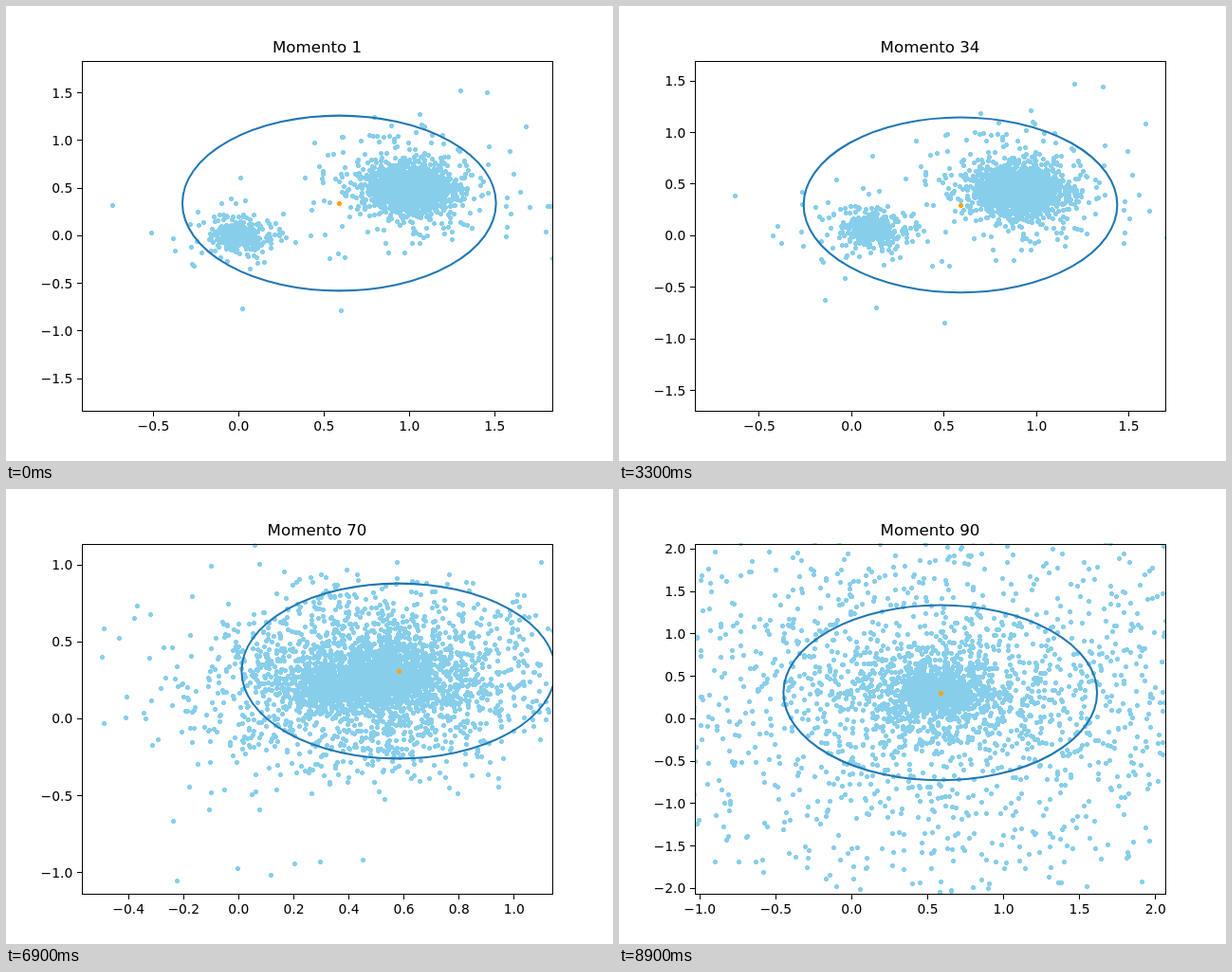
These frames come from a looping animation (640 px wide and 480 px high, 9000 ms). An HTML page with a canvas:

```html
<!DOCTYPE html>
<html lang="es">
<head>
<meta charset="utf-8">
<title>Momento</title>
<style>
  html, body { margin: 0; width: 100%; height: 100%; overflow: hidden; background: #fff; }
  canvas { display: block; }
</style>
</head>
<body>
<canvas id="plot" width="640" height="480"></canvas>
<script>
const ctx = document.getElementById('plot').getContext('2d');
const STEP_MS = 100, STEPS = 90, BURST = 62, TAU = 2 * Math.PI;
const BOX = { left: 80, top: 57.6, width: 496, height: 369.6 };
const X0 = BOX.left + BOX.width / 3, Y0 = BOX.top + BOX.height / 2;
const FONT = '"DejaVu Sans", sans-serif';

// Smooth curve through [time, value] keys
function track(...keys) {
  const last = keys.length - 1;
  const slope = k => {
    const a = keys[Math.max(k - 1, 0)], b = keys[Math.min(k + 1, last)];
    return (b[1] - a[1]) / (b[0] - a[0]);
  };
  return t => {
    let k = 0;
    while (k < last - 1 && t >= keys[k + 1][0]) k++;
    const [ta, a] = keys[k], [tb, b] = keys[k + 1];
    const d = tb - ta, u = (t - ta) / d, w = 1 - u;
    return a * (1 + 2 * u) * w * w + b * u * u * (3 - 2 * u)
      + d * u * w * (slope(k) * w - slope(k + 1) * u);
  };
}

const range = track([0, 1.838], [23, 1.779], [33, 1.697], [50, 1.502],
  [61, 1.0706], [66, 0.95], [76, 1.685], [89, 2.064]);
const centre = {
  x: track([0, 0.589], [50, 0.587], [76, 0.578], [89, 0.583]),
  y: track([0, 0.342], [23, 0.302], [50, 0.304], [76, 0.312], [89, 0.307])
};
const big = {
  x: track([0, 1], [33, 0.905], [50, 0.725], [61, 0.47], [76, 0.59], [89, 0.585]),
  y: track([0, 0.5], [33, 0.44], [50, 0.37], [61, 0.225], [76, 0.32], [89, 0.305])
};
const small = {
  x: track([0, 0], [33, 0.11], [50, 0.285], [61, 0.34], [76, 0.3], [89, 0.5]),
  y: track([0, 0], [33, 0.065], [50, 0.14], [61, 0.2], [76, 0.2], [89, 0.29])
};

let seed = 20417;
function rand() {
  seed = (seed + 0x6D2B79F5) | 0;
  let h = Math.imul(seed ^ (seed >>> 15), 1 | seed);
  h = (h + Math.imul(h ^ (h >>> 7), 61 | h)) ^ h;
  return ((h ^ (h >>> 14)) >>> 0) / 4294967296;
}

const bodies = [];
function addBody(path, r, speed, heading, start) {
  const a = rand() * TAU;
  bodies.push({
    path, start,
    x: r * Math.cos(a), y: r * Math.sin(a),
    vx: speed * Math.cos(heading), vy: speed * Math.sin(heading)
  });
}

// Round cluster with a dense core and a thin tail; most bodies fly apart after the burst
function addCluster(path, count, core) {
  for (let n = 0; n < count; n++) {
    const u = rand() * 0.998;
    const r = core * (u / (1 - u)) ** 0.42;
    const speed = rand() < 0.72 ? 0.09 * rand() ** 1.8 : 0;
    addBody(path, r, speed, rand() * TAU, BURST);
  }
}
addCluster(big, 3000, 0.11);
addCluster(small, 650, 0.068);

// Early escapes, mostly to the left
for (let n = 0; n < 50; n++) {
  const heading = Math.PI + (rand() - 0.5) * 3.6;
  addBody(small, 0.05 * rand(), 0.01 + 0.03 * rand(), heading, 12 + 46 * rand());
}

function dot(x, y) {
  x = Math.round(x);
  y = Math.round(y);
  ctx.fillRect(x - 2, y - 1, 5, 3);
  ctx.fillRect(x - 1, y - 2, 3, 5);
}

const tickStep = span => [0.1, 0.2, 0.25, 0.5, 1].find(s => span / s <= 9);

function ticks(low, high, draw) {
  const step = tickStep(high - low);
  for (let n = Math.ceil(low / step); n * step <= high; n++) {
    const v = n * step;
    const text = Math.abs(v).toFixed(step === 0.25 ? 2 : 1);
    draw(v, n < 0 ? '\u2212' + text : text);
  }
}

function drawAxes(r, px, py) {
  ctx.fillStyle = ctx.strokeStyle = '#000';
  ctx.lineWidth = 1;
  ctx.strokeRect(80.5, 58.5, 496, 369);
  ctx.font = '13.89px ' + FONT;
  ctx.textAlign = 'center';
  ticks(-r / 2, r, (v, text) => {
    ctx.fillRect(Math.round(px(v) - 0.5), 428, 1, 5);
    ctx.fillText(text, px(v), 448);
  });
  ctx.textAlign = 'right';
  ticks(-r, r, (v, text) => {
    ctx.fillRect(75, Math.round(py(v) - 0.5), 5, 1);
    ctx.fillText(text, 70.3, Math.round(py(v) + 5));
  });
}

function draw(i) {
  const r = range(i);
  const px = x => X0 + x * BOX.width / 1.5 / r;
  const py = y => Y0 - y * BOX.height / 2 / r;

  ctx.fillStyle = '#fff';
  ctx.fillRect(0, 0, 640, 480);
  ctx.save();
  ctx.beginPath();
  ctx.rect(BOX.left, BOX.top, BOX.width, BOX.height);
  ctx.clip();

  ctx.fillStyle = '#87ceeb';
  const at = new Map([big, small].map(p => [p, [p.x(i), p.y(i)]]));
  for (const b of bodies) {
    const [x, y] = at.get(b.path);
    const age = Math.max(0, i - b.start);
    dot(px(x + b.x + b.vx * age), py(y + b.y + b.vy * age));
  }

  const cx = px(centre.x(i)), cy = py(centre.y(i));
  ctx.fillStyle = '#ffa500';
  dot(cx, cy);
  ctx.strokeStyle = '#1f77b4';
  ctx.lineWidth = 2.08;
  ctx.beginPath();
  ctx.ellipse(cx, cy, BOX.width / 3, BOX.height / 4, 0, 0, TAU);
  ctx.stroke();
  ctx.restore();

  drawAxes(r, px, py);
  ctx.font = '16.67px ' + FONT;
  ctx.textAlign = 'center';
  ctx.fillText('Momento ' + (i + 1), 328, 49);
}

const begin = performance.now();
let shown = -1;
function tick() {
  const i = Math.floor((performance.now() - begin) / STEP_MS) % STEPS;
  if (i !== shown) draw(shown = i);
  requestAnimationFrame(tick);
}
tick();
</script>
</body>
</html>
```
